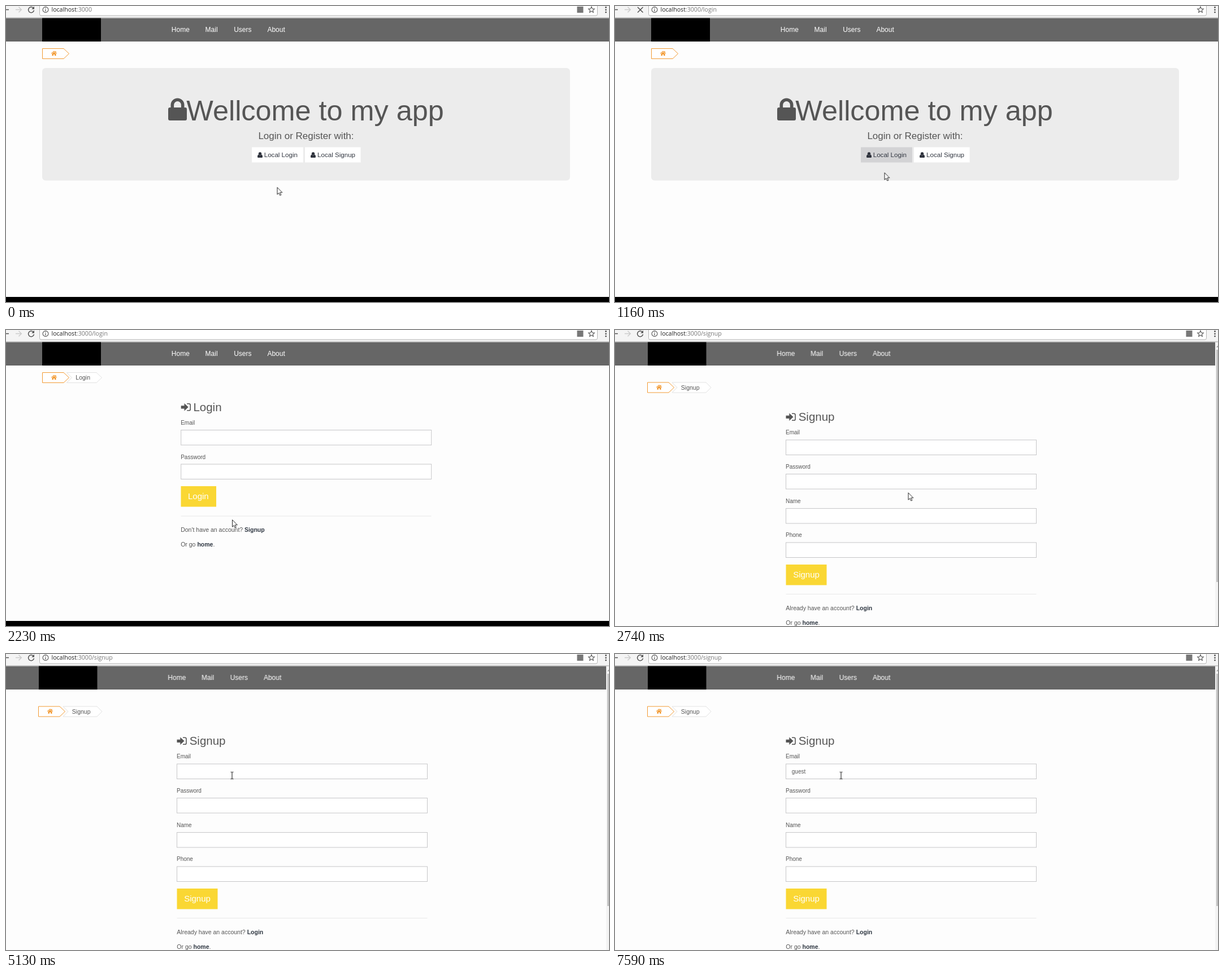
An HTML page for the animation above (8000 ms loop, 1067 by 525 pixels).

```html
<!DOCTYPE html>
<html lang="en">
<head>
<meta charset="utf-8">
<title>Login and signup</title>
<style>
html, body { margin: 0; width: 100%; height: 100%; overflow: hidden; background: #fdfdfd; }
svg { display: block; width: 1067px; height: 525px; }
text { font: 10.5px "Liberation Sans", Arial, sans-serif; fill: #555; white-space: pre; }
.url { font: 10.6px "Open Sans", "Noto Sans", sans-serif; fill: #777; }
.url .host { fill: #222; }
.nav text { font-size: 12px; fill: #fff; }
.big { font-size: 50.4px; }
.sub { font-size: 17px; }
.btn { font-size: 11.6px; fill: #333842; }
.title { font-size: 20.5px; }
.label, .typed { font-size: 10px; }
.send { font-size: 15px; fill: #fff; }
.link { font-weight: bold; fill: #2f3742; }
.field { fill: #fff; stroke: #c6c6c8; }
.icon { fill: none; stroke: #555; stroke-width: 1.6; }

/* every change is a hard cut: percent = ms / 80 */
.a { animation: 8s step-end infinite; }
.home { animation-name: home; }
.login { animation-name: login; }
.signup { animation-name: signup; }
.head { animation-name: head; }
.u0 { animation-name: u0; }
.u1 { animation-name: u1; }
.u2 { animation-name: u2; }
.busy { animation-name: busy; }
.idle { animation-name: idle; }
.b1 { animation-name: b1; }
.b2 { animation-name: b2; }
.b3 { animation-name: b3; }
.cursor { animation-name: cursor; }
.arrow { animation-name: arrow; }
.hand { animation-name: hand; }
.beam { animation-name: beam; }
.caret { animation-name: blink, caret; }
.t1 { animation-name: t1; }
.t2 { animation-name: t2; }
.t3 { animation-name: t3; }
.panel { animation-name: panel; }

@keyframes home { 0% { opacity: 1 } 16%, 100% { opacity: 0 } }
@keyframes login { 0% { opacity: 0 } 16% { opacity: 1 } 34.25%, 100% { opacity: 0 } }
@keyframes signup { 0% { opacity: 0 } 34.25%, 100% { opacity: 1 } }
@keyframes head { 0% { transform: none } 34.25%, 100% { transform: translate(-6.5px, 0) } }
@keyframes u0 { 0% { opacity: 1 } 14.5%, 100% { opacity: 0 } }
@keyframes u1 { 0% { opacity: 0 } 14.5% { opacity: 1 } 32.375%, 100% { opacity: 0 } }
@keyframes u2 { 0% { opacity: 0 } 32.375%, 100% { opacity: 1 } }
@keyframes busy { 0%, 17.625% { opacity: 0 } 14.5%, 32.375% { opacity: 1 } 34.25%, 100% { opacity: 0 } }
@keyframes idle { 0%, 17.625% { opacity: 1 } 14.5%, 32.375% { opacity: 0 } 34.25%, 100% { opacity: 1 } }
@keyframes b1 { 0%, 9.25% { fill: #fff } 7.25%, 11%, 100% { fill: #d3d3d5 } }
@keyframes b2 { 0%, 11%, 100% { fill: #fff } 9.25% { fill: #d3d3d5 } }
@keyframes b3 { 0%, 26.375%, 100% { fill: #fad733 } 23% { fill: #f0c814 } }
@keyframes cursor {
  0% { transform: translate(479.5px, 321px) }
  1.875% { transform: translate(479px, 305px) }
  3.75% { transform: translate(478.5px, 291px) }
  5.375% { transform: translate(477px, 279px) }
  7.25% { transform: translate(478px, 273px) }
  9.25% { transform: translate(534px, 269px) }
  11% { transform: translate(480px, 269px) }
  12.625% { transform: translate(478px, 269px) }
  14.5% { transform: translate(476.5px, 295px) }
  16% { transform: translate(476px, 303px) }
  17.625% { transform: translate(476px, 308px) }
  21.375% { transform: translate(410px, 305px) }
  23% { transform: translate(350px, 301px) }
  24.5% { transform: translate(345px, 300px) }
  26.375% { transform: translate(364px, 318px) }
  27.875% { transform: translate(400px, 336px) }
  29.375% { transform: translate(432px, 352px) }
  30.875% { transform: translate(438px, 353px) }
  34.25% { transform: translate(518.5px, 288px) }
  37.75% { transform: translate(475px, 262px) }
  39.25% { transform: translate(425px, 233px) }
  40.75% { transform: translate(401px, 219.5px) }
  42.625%, 100% { transform: translate(400px, 215.5px) }
}
@keyframes arrow {
  0%, 14.5%, 26.375%, 34.25%, 39.25% { opacity: 1 }
  7.25%, 23%, 29.375%, 37.75%, 40.75%, 100% { opacity: 0 }
}
@keyframes hand {
  0%, 14.5%, 26.375%, 34.25%, 100% { opacity: 0 }
  7.25%, 23%, 29.375% { opacity: 1 }
}
@keyframes beam { 0%, 39.25% { opacity: 0 } 37.75%, 40.75%, 100% { opacity: 1 } }
@keyframes blink {
  0%, 51%, 64.125%, 81.125%, 94.875%, 100% { opacity: 0 }
  46%, 57.625%, 71.125%, 88.125% { opacity: 1 }
}
@keyframes caret {
  0% { transform: none }
  71.125% { transform: translate(11px, 0) }
  73% { transform: translate(22px, 0) }
  74.5%, 100% { transform: translate(24px, 0) }
}
@keyframes t1 { 0% { fill-opacity: 0 } 71.125%, 100% { fill-opacity: 1 } }
@keyframes t2 { 0% { fill-opacity: 0 } 73%, 100% { fill-opacity: 1 } }
@keyframes t3 { 0% { fill-opacity: 0 } 74.5%, 100% { fill-opacity: 1 } }
@keyframes panel { 0%, 74.5%, 100% { opacity: 0 } 71.125% { opacity: 1 } }
</style>
</head>
<body>
<svg viewBox="0 0 1067 525" xmlns="http://www.w3.org/2000/svg">
  <defs>
    <g id="user" fill="#2e323c">
      <circle cx="4.5" cy="3" r="2.7"/>
      <path d="M2 4.6C.4 5 0 6.8 0 8.4 0 9.6.7 10 1.6 10h5.8C8.300 10 9 9.600 9 8.400 9 6.800 8.600 5 7 4.600 5.500 6.200 3.500 6.200 2 4.600z"/>
    </g>
    <g id="crumb">
      <path d="M64.500 75.500H102L111.500 84.500 102 93.500H64.500z" fill="#fff" stroke="#f29a33"/>
      <path d="M85 79.600l5.200 4.500-.7.700-4.500-3.900-4.500 3.900-.7-.700zM81.500 84.700l3.500-3 3.500 3v3.600h-2.500v-2.600h-2v2.600h-2.500zM87.300 80h1.300v2.500l-1.300-1.100z" fill="#f29a33"/>
    </g>
    <g id="enter">
      <path d="M302.500 151.700h5.800v-4.200l7.200 6.800-7.200 6.800v-4.200h-5.800z" fill="#555"/>
      <path class="icon" d="M313 148.300h3.600a2.400 2.400 0 0 1 2.400 2.400v7.200a2.400 2.400 0 0 1-2.400 2.400H313"/>
    </g>
    <rect id="box" class="field" x="302.500" width="443" height="26.500"/>
  </defs>

  <rect width="1067" height="525" fill="#fdfdfd"/>

  <!-- browser bar -->
  <rect width="1067" height="21" fill="#f4f4f4"/>
  <path d="M0 20.500H1067" stroke="#c4c4c4"/>
  <rect x="59.500" y="-6.500" width="987" height="23.500" rx="2.500" fill="#fff" stroke="#b4b4b4"/>
  <g fill="none" stroke="#505050" stroke-width="1.500">
    <path d="M-4 6.500H5"/>
    <path d="M17 6.500H27M22.500 1.700L27.300 6.500 22.500 11.300" stroke="#ccc"/>
    <g class="a idle">
      <path d="M48.300 3.400A5 5 0 1 0 49.500 7.600"/>
      <path d="M50 .8V5.600H45.200z" fill="#505050" stroke="none"/>
    </g>
    <path class="a busy" d="M40 2L49.500 11.500M49.500 2L40 11.500"/>
    <circle cx="70" cy="6.500" r="4.900" stroke-width="1.100"/>
    <path d="M70 5.800V9.500M70 3.300V4.600" stroke-width="1.200"/>
    <path d="M1036 1.300l1.500 3.500 3.800.3-2.900 2.500.9 3.700-3.300-2-3.300 2 .9-3.700-2.900-2.500 3.800-.3z" stroke-width="1.100"/>
  </g>
  <rect class="a idle" x="1010.500" y="1" width="11" height="11" fill="#777"/>
  <g fill="#505050">
    <circle cx="1061.500" cy="2.500" r="1.400"/>
    <circle cx="1061.500" cy="6.800" r="1.400"/>
    <circle cx="1061.500" cy="11.100" r="1.400"/>
  </g>
  <text class="url a u0" x="80.500" y="10.300"><tspan class="host">localhost</tspan>:3000</text>
  <text class="url a u1" x="80.500" y="10.300"><tspan class="host">localhost</tspan>:3000/login</text>
  <text class="url a u2" x="80.500" y="10.300"><tspan class="host">localhost</tspan>:3000/signup</text>

  <!-- site bar -->
  <rect y="21.500" width="1067" height="41.500" fill="#666"/>
  <g class="nav a head">
    <rect x="64" y="21.500" width="104" height="41.500" fill="#000"/>
    <text x="292.800" y="46.300">Home</text>
    <text x="352.600" y="46.300">Mail</text>
    <text x="403.200" y="46.300">Users</text>
    <text x="462.400" y="46.300">About</text>
  </g>

  <g class="a home">
    <use href="#crumb"/>
    <rect x="64" y="110" width="934" height="199.500" rx="6" fill="#ececec"/>
    <rect x="287" y="180" width="33" height="23" rx="3" fill="#555"/>
    <path d="M294.300 182V175.500a9.200 9.200 0 0 1 18.400 0V182" fill="none" stroke="#555" stroke-width="5.600"/>
    <text class="big" x="319.300" y="203">Wellcome to my app</text>
    <text class="sub" x="446.400" y="235.500">Login or Register with:</text>
    <rect class="a b1" x="435" y="250.500" width="91" height="27" fill="#fff"/>
    <rect class="a b2" x="529" y="250.500" width="98.500" height="27" fill="#fff"/>
    <use href="#user" x="445" y="259"/>
    <use href="#user" x="539" y="259"/>
    <text class="btn" x="456.700" y="268.400">Local Login</text>
    <text class="btn" x="551" y="268.400">Local Signup</text>
    <rect y="516" width="1067" height="9" fill="#000"/>
  </g>

  <g class="a login">
    <path d="M107.500 75.500H160L169.500 84.500 160 93.500H107.500L116.500 84.500z" fill="#fff" stroke="#e2e2e2"/>
    <use href="#crumb"/>
    <text x="123.300" y="88">Login</text>
    <g transform="translate(7.200 -17.500)">
      <use href="#enter"/>
      <text class="title" x="324.200" y="161.300">Login</text>
      <text class="label" x="302" y="185.300">Email</text>
      <use href="#box" y="195"/>
      <text class="label" x="302" y="246">Password</text>
      <use href="#box" y="255.500"/>
    </g>
    <rect class="a b3" x="309.500" y="277" width="62.500" height="36.500" fill="#fad733"/>
    <text class="send" x="322" y="300.300">Login</text>
    <path d="M309.500 330H752.500" stroke="#e8e8e8"/>
    <text x="309.200" y="358.400">Don't have an account? <tspan class="link">Signup</tspan></text>
    <text x="309.200" y="384">Or go <tspan class="link">home</tspan>.</text>
    <rect y="516" width="1067" height="9" fill="#000"/>
  </g>

  <g class="a signup">
    <path d="M101 93H161L170 102 161 111H101L110 102z" fill="#fff" stroke="#e2e2e2"/>
    <use href="#crumb" transform="translate(-7 17.500)"/>
    <text x="116.800" y="105.500">Signup</text>
    <use href="#enter"/>
    <text class="title" x="324.700" y="161.300">Signup</text>
    <text class="label" x="302" y="185.300">Email</text>
    <use href="#box" y="195"/>
    <text class="label" x="302" y="246">Password</text>
    <use href="#box" y="255.500"/>
    <text class="label" x="302" y="306.500">Name</text>
    <use href="#box" y="316.500"/>
    <text class="label" x="302" y="367.300">Phone</text>
    <use href="#box" y="377"/>
    <rect x="302.500" y="416" width="72" height="36.500" fill="#fad733"/>
    <text class="send" x="315.200" y="439.300">Signup</text>
    <path d="M302.500 468.500H745.500" stroke="#e8e8e8"/>
    <text x="302.300" y="497.200">Already have an account? <tspan class="link">Login</tspan></text>
    <text x="302.300" y="522.700">Or go <tspan class="link">home</tspan>.</text>
    <rect class="a panel" x="302.500" y="222.500" width="442" height="58" fill="#fff" stroke="#c8c8c8"/>
    <text class="typed" x="312.800" y="211.800"><tspan class="a t1">gu</tspan><tspan class="a t2">es</tspan><tspan class="a t3">t</tspan></text>
    <rect class="a caret" x="313" y="203" width="1" height="11" fill="#333"/>
    <rect x="1062" y="21.500" width="5" height="503.500" fill="#f3f3f3"/>
    <rect x="1064" y="35" width="3" height="412" fill="#c1c1c1"/>
    <path d="M1064 30.500L1067 27.500V30.500z" fill="#999"/>
  </g>

  <g class="a cursor">
    <path class="a arrow" d="M.5.700V13.200L3.300 10.600 5.300 15 7.300 14.100 5.300 9.800H9.300z" fill="#fff" stroke="#111" stroke-width=".9"/>
    <path class="a hand" d="M-1 9V1.500a1.200 1.200 0 0 1 2.400 0V6a1.200 1.200 0 0 1 2.300.4 1.200 1.200 0 0 1 2.200.5 1.100 1.100 0 0 1 2 .7V12L6.500 17H.5L-4 10.700C-4.800 9-2.800 7.500-1 9z" fill="#fff" stroke="#111" stroke-width=".9"/>
    <path class="a beam" d="M-2.500-6H-.8L0-5.500.8-6H2.500M0-5.500V5.500M-2.500 6H-.8L0 5.500.8 6H2.500" fill="none" stroke="#111"/>
  </g>
</svg>
</body>
</html>
```
